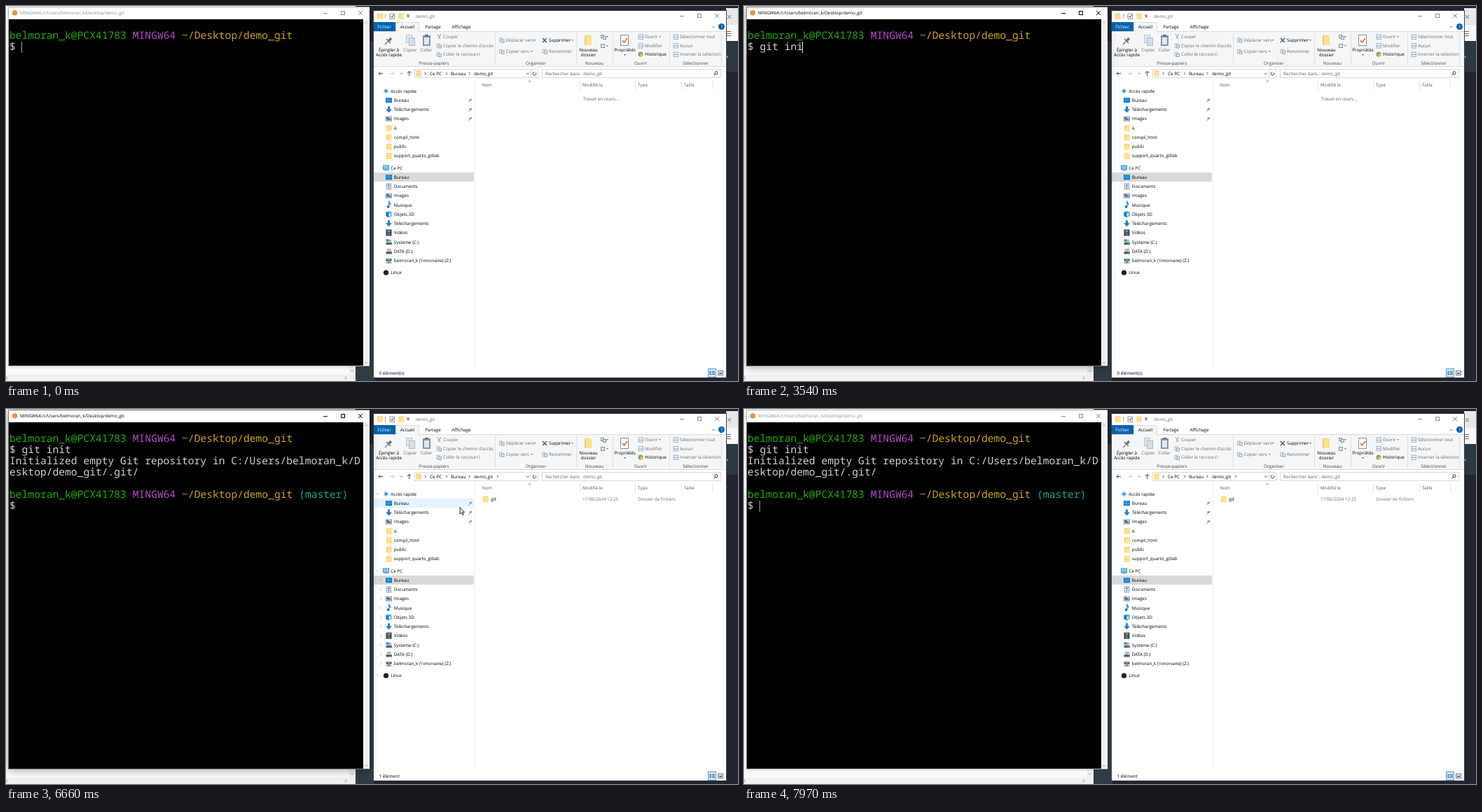
Write an HTML page with a canvas that moves like this. It is 1045x536 px and loops after 8 s.

```html
<!DOCTYPE html>
<html lang="fr">
<head>
<meta charset="utf-8">
<title>git init</title>
<style>
html, body { margin: 0; width: 100%; height: 100%; overflow: hidden; background: #22252f; }
canvas { display: block; }
</style>
</head>
<body>
<canvas id="stage" width="1045" height="536"></canvas>
<script>
const ctx = document.getElementById('stage').getContext('2d');
const LOOP = 8000;
const UI = '"Open Sans", "Noto Sans", sans-serif';
const MONO = '"Noto Sans Mono", "DejaVu Sans Mono", monospace';
const CELL = 8.79, ROW = 16;
const USER = 'belmoran_k';
const GREEN = '#20ad0a', PURPLE = '#b44cc8', GOLD = '#cda41c', CYAN = '#10a99b', WHITE = '#d2d2d2';
const INK = '#000', DIM = '#6a6a6a';

const clamp = v => Math.max(0, Math.min(1, v));
const ramp = (t, from, to) => clamp((t - from) / (to - from));

function box(x, y, w, h, fill, stroke) {
  if (fill) { ctx.fillStyle = fill; ctx.fillRect(x, y, w, h); }
  if (stroke) { ctx.strokeStyle = stroke; ctx.lineWidth = 1; ctx.strokeRect(x + .5, y + .5, w - 1, h - 1); }
}
function line(color, width, ...pts) {
  ctx.strokeStyle = color;
  ctx.lineWidth = width;
  ctx.beginPath();
  for (let i = 0; i < pts.length; i += 2) ctx.lineTo(pts[i], pts[i + 1]);
  ctx.stroke();
}
function poly(fill, ...pts) {
  ctx.fillStyle = fill;
  ctx.beginPath();
  for (let i = 0; i < pts.length; i += 2) ctx.lineTo(pts[i], pts[i + 1]);
  ctx.closePath();
  ctx.fill();
}
function disc(x, y, r, fill) {
  ctx.fillStyle = fill;
  ctx.beginPath();
  ctx.arc(x, y, r, 0, 7);
  ctx.fill();
}
// y is the vertical middle of the letters
function label(text, x, y, color = INK, align = 'left', size = 6.3) {
  ctx.font = `${size}px ${UI}`;
  ctx.textAlign = align;
  ctx.fillStyle = color;
  ctx.fillText(text, x, y + size * .36);
}
const chevron = {
  right: (x, y, c, r = 2) => line(c, 1, x - r / 2, y - r, x + r / 2, y, x - r / 2, y + r),
  down: (x, y, c, r = 2) => line(c, 1, x - r, y - r / 2, x, y + r / 2, x + r, y - r / 2),
  up: (x, y, c, r = 2) => line(c, 1, x - r, y + r / 2, x, y - r / 2, x + r, y + r / 2),
  left: (x, y, c, r = 2) => line(c, 1, x + r / 2, y - r, x - r / 2, y, x + r / 2, y + r),
};
const dropMark = (x, y, c = '#666') => poly(c, x - 1.7, y - 1, x + 1.7, y - 1, x, y + 1);

function windowButtons(x, y, gap, color) {
  line(color, 1, x - 3, y + .5, x + 3, y + .5);
  box(x + gap - 3, y - 3, 6, 6, null, color);
  const cx = x + 2 * gap;
  line(color, 1, cx - 3, y - 3, cx + 3, y + 3);
  line(color, 1, cx - 3, y + 3, cx + 3, y - 3);
}

// Small icons, centred on x, y
const icons = {
  folder(x, y) {
    box(x - 3.5, y - 4, 7.5, 8.5, '#f6d06f');
    box(x - 2.5, y - 3, 6.5, 7.5, '#ffe08c');
  },
  star(x, y) {
    const pts = [];
    for (let i = 0; i < 10; i++) {
      const a = i * Math.PI / 5 - .9, r = i % 2 ? 1.7 : 4.2;
      pts.push(x + r * Math.cos(a), y + r * Math.sin(a));
    }
    poly('#2f97d9', ...pts);
  },
  desktop(x, y) {
    box(x - 4.5, y - 3.5, 9, 7, '#0b6fc0');
    box(x - 3.5, y - 2.5, 7, 4.5, '#1e9bf0');
  },
  download(x, y) {
    poly('#1f7fd6', x - 1.5, y - 4.5, x + 1.5, y - 4.5, x + 1.5, y - .5, x + 4.5, y - .5,
      x, y + 4.5, x - 4.5, y - .5, x - 1.5, y - .5);
  },
  picture(x, y) {
    box(x - 4.5, y - 3.5, 9, 7, '#e7eef3', '#8b98a3');
    box(x - 3, y - 1, 6, 3, '#4b86b5');
    box(x - 3, y - 2, 3, 2, '#35566f');
  },
  computer(x, y) {
    box(x - 4.5, y - 4, 9, 6.5, '#2c87c6');
    box(x - 3.7, y - 3.2, 7.4, 4.8, '#79cdf5');
    box(x - 2.5, y + 3, 6, 1, '#6c8ca3');
  },
  document(x, y) {
    box(x - 3.5, y - 4.5, 7, 9, '#f4f8fb', '#8d9aa5');
    box(x - 1.5, y - 2.5, 3, 2, '#3d8cc8');
    box(x - 1.5, y + .5, 3, 2, '#7ea6c2');
  },
  music(x, y) {
    disc(x - 1, y + 2.5, 2, '#1683d8');
    line('#1683d8', 1.3, x + .4, y + 2.5, x + .4, y - 4.5, x + 2.8, y - .5);
  },
  cube(x, y) {
    poly('#46b4e6', x, y - 4.5, x + 4, y - 3, x + 4, y + 3, x, y + 4.5, x - 4, y + 3, x - 4, y - 3);
    poly('#147fbd', x - 4, y - 3, x, y - 1.5, x, y + 4.5, x - 4, y + 3);
    box(x, y - 1, 2.5, 3.5, '#d5f0fb');
  },
  video(x, y) {
    box(x - 4, y - 4.5, 8, 9, '#3c4148');
    box(x - 2, y - 3.5, 4, 3, '#7d95a8');
    box(x - 2, y + .5, 4, 3, '#5f7690');
  },
  drive(x, y) {
    box(x - 4, y + .5, 8.5, 3.5, '#59636b');
    box(x - 2.5, y - 3.5, 6, 3.5, '#a9b8c1');
    box(x + 2, y + 2, 1.5, 1, '#5fe06b');
  },
  systemDrive(x, y) {
    icons.drive(x, y);
    box(x - 4, y - 4, 4, 3.5, '#1f9de8');
  },
  network(x, y) {
    box(x - 4, y - 2.5, 8, 3.5, '#4d5a52');
    box(x - 2.5, y - 1.5, 5, 1, '#b9c6bd');
    box(x - 1, y + 1, 2, 3, '#28a745');
    box(x - 4, y + 2.5, 8, 1.2, '#28a745');
  },
  dot(x, y) { disc(x, y, 3.6, '#222'); },
  tick(x, y) {
    box(x - 3.5, y - 4, 7.5, 8.5, '#fff', '#999');
    line('#333', 1, x - 1.5, y, x, y + 2, x + 2.5, y - 2);
  },
  tile(x, y) {
    box(x - 3.5, y - 3.5, 7.5, 7.5, '#e8eef4', '#a8b8c8');
    line('#8fabc4', 1, x - 3, y + .5, x + 4, y + .5);
  },
  page(x, y) {
    box(x - 3.5, y - 3, 5, 6, '#eef2f6', '#a9b6c3');
    box(x - 1, y - 1, 5, 5, '#dfe8f0', '#90a8bf');
  },
  pin(x, y) {
    line('#888', 2, x - .3, y + .3, x + 1.8, y - 1.8);
    line('#888', 1, x - 2.7, y + 2.7, x, y, x - 2, y - 1);
  },
};

// [icon, text, y, indent, chevron]
const nav = [
  ['star', 'Accès rapide', 121.5, 0, 'down'],
  ['desktop', 'Bureau', 134.7, 1, 'pin'],
  ['download', 'Téléchargements', 148, 1, 'pin'],
  ['picture', 'Images', 161.2, 1, 'pin'],
  ['folder', 'A', 174.4, 1],
  ['folder', 'compil_html', 187.6, 1],
  ['folder', 'public', 200.9, 1],
  ['folder', 'support_quarto_gitlab', 214.1, 1],
  ['computer', 'Ce PC', 231.5, 0, 'down'],
  ['desktop', 'Bureau', 244.8, 1, 'right'],
  ['document', 'Documents', 258, 1, 'right'],
  ['picture', 'Images', 271.2, 1, 'right'],
  ['music', 'Musique', 284.4, 1, 'right'],
  ['cube', 'Objets 3D', 297.6, 1, 'right'],
  ['download', 'Téléchargements', 310.8, 1, 'right'],
  ['video', 'Vidéos', 324, 1, 'right'],
  ['systemDrive', 'Systeme (C:)', 337.3, 1, 'right'],
  ['drive', 'DATA (D:)', 350.5, 1, 'right'],
  ['network', USER + ' (\\\\morvane) (Z:)', 363.8, 1, 'right'],
  ['dot', 'Linux', 381.2, 0, 'right'],
];
const SELECTED = 9, NETWORK = 18;

function backdrop() {
  box(0, 0, 1045, 536, '#22252f');
  box(0, 0, 499, 536, '#fafafa');
  box(0, 527, 499, 9, '#f1f1f1');
  box(489, 514, 10, 13, '#f1f1f1');
  chevron.down(494, 521.5, '#999');
  chevron.right(485, 531.5, '#888');
  chevron.left(1, 531.5, '#888');
  box(499, 50, 26, 486, '#2f3c45');
  box(1028, 3, 17, 24, '#e6e8ec');
  box(1028, 27, 17, 23, '#f8f8f9');
  box(1028, 50, 17, 44, '#2a3942');
  line('#666', 1, 1030, 13, 1035, 18);
  line('#666', 1, 1030, 18, 1035, 13);
  for (const y of [36.5, 39.5, 42.5]) line('#666', 1, 1029, y, 1035, y);
  line('#d5dde0', 1.2, 1027, 68, 1030, 74);
}

function ribbon() {
  box(525, 36, 503, 51, '#f5f6f7');
  line('#dadbdc', 1, 525, 86.5, 1028, 86.5);
  line('#dadbdc', 1, 525, 36.5, 1028, 36.5);
  box(525, 23, 31, 13, '#0063b1');
  label('Fichier', 540, 29.8, '#fff', 'center');
  box(556, 23, 34, 14, '#f5f6f7');
  line('#dadbdc', 1, 556.5, 37, 556.5, 23.5, 589.5, 23.5, 589.5, 37);
  label('Accueil', 573, 29.8, INK, 'center');
  label('Partage', 609.5, 29.8, INK, 'center');
  label('Affichage', 650, 29.8, INK, 'center');
  chevron.up(1010, 30, '#888');
  disc(1021.5, 29.5, 4.5, '#0063b1');
  label('?', 1021.5, 29.5, '#fff', 'center');
  for (const x of [698.5, 814.5, 866.5, 947.5, 1021.5]) line('#dedfe0', 1, x, 39, x, 84);

  const groups = [['Presse-papiers', 611], ['Organiser', 756.5], ['Nouveau', 840], ['Ouvrir', 906], ['Sélectionner', 984.5]];
  for (const [text, x] of groups) label(text, x, 81.6, '#444', 'center');

  const large = [['Épingler à', 546.5, 63], ['Accès rapide', 546.5, 70], ['Nouveau', 831.5, 63], ['dossier', 831.5, 70], ['Propriétés', 883.5, 63]];
  for (const [text, x, y] of large) label(text, x, y, INK, 'center');
  label('Copier', 577, 63, DIM, 'center');
  label('Coller', 600, 63, DIM, 'center');
  dropMark(883.5, 70);

  const small = [
    ['Couper', 624, 44], ["Copier le chemin d'accès", 624, 56.5], ['Coller le raccourci', 624, 69],
    ['Déplacer vers', 713.5, 48.5], ['Copier vers', 713.5, 64.7], ['Renommer', 775, 64.7],
    ['Ouvrir', 912, 44], ['Modifier', 912, 56.5],
    ['Sélectionner tout', 962, 44], ['Aucun', 962, 56.5], ['Inverser la sélection', 962, 69],
  ];
  for (const [text, x, y] of small) {
    label(text, x, y, DIM);
    if (text === 'Couper') {
      line('#8a939b', 1, 616, 40, 620, 47);
      line('#8a939b', 1, 621, 40, 617, 47);
    } else (x === 962 || x === 912 ? icons.tile : icons.page)(x - 6, y);
  }
  label('Supprimer', 775, 48.5);
  label('Historique', 912, 69);
  line('#445c7a', 1.5, 766, 46, 772, 52);
  line('#445c7a', 1.5, 766, 52, 772, 46);
  disc(906, 69, 3.5, '#7fa65c');
  disc(907, 70, 2, '#e7c54a');
  for (const [x, y] of [[755, 49], [750.5, 65], [808.5, 49], [933.5, 44], [858.5, 44], [858.5, 57]]) dropMark(x, y, '#888');

  line('#6c7780', 3.5, 546, 50, 550, 46);
  line('#6c7780', 1.2, 541, 55, 546, 50);
  line('#6c7780', 1.5, 543, 47, 549, 53);
  box(571, 41, 9, 12, '#dfe8f0', '#b4c3d2');
  box(575, 45, 9, 12, '#d3e0ec', '#a9bccf');
  box(595, 42, 11, 15, '#8296ac');
  box(597, 45, 7, 10, '#e3e9ef');
  box(598, 41, 5, 2, '#5d6b79');
  box(826, 42, 9, 14, '#f4cd68');
  box(828, 43, 8, 13, '#ffe18d');
  box(849, 41, 5, 5, '#dce6ef', '#8194a8');
  box(852, 43, 5, 5, '#dce6ef', '#8194a8');
  box(849, 54, 6, 6, '#dce6ef', '#8194a8');
  box(877, 41, 12, 16, '#fff', '#8c8c8c');
  line('#d0752c', 1.7, 880, 49, 882.5, 52, 887, 46);
}

function addressBar(loaded) {
  const arrow = (x, y, c, s) => {
    line(c, 1, x - 3, y, x + 3, y);
    line(c, 1, x + s * .5, y - 2.5, x + s * 3, y, x + s * .5, y + 2.5);
  };
  arrow(535, 96.5, '#444', -1);
  arrow(551, 96.5, '#ccc', 1);
  chevron.down(564.5, 96.5, '#777', 1.5);
  line('#444', 1, 575.7, 100, 575.7, 93.5);
  line('#444', 1, 573, 96, 575.7, 93.2, 578.5, 96);
  box(583, 90, 177, 13, '#fff', '#d9d9d9');
  box(765, 90, 256, 13, '#fff', '#d9d9d9');
  icons.folder(589, 96.3);
  for (const x of [598.5, 629, 661.5]) chevron.right(x, 96.5, '#444', 1.7);
  if (loaded) chevron.right(702, 96.5, '#444', 1.7);
  label('Ce PC', 605, 96.3);
  label('Bureau', 635, 96.3);
  label('demo_git', 668, 96.3);
  chevron.down(745, 96.7, '#555');
  line('#d9d9d9', 1, 749.5, 91, 749.5, 102);
  ctx.strokeStyle = '#444';
  ctx.beginPath();
  ctx.arc(754.5, 96.7, 2.3, -.6, 4.6);
  ctx.stroke();
  label('Rechercher dans : demo_git', 770, 96.3, '#606060');
  ctx.strokeStyle = '#333';
  ctx.beginPath();
  ctx.arc(1014, 95.7, 2, 0, 7);
  ctx.stroke();
  line('#333', 1, 1012.5, 97.2, 1010.5, 99.5);
}

function navigation(chevrons, hovered) {
  nav.forEach(([icon, text, y, indent, mark], i) => {
    if (i === SELECTED) box(525, Math.round(y - 6.6), 143, 13, '#d9d9d9');
    else if (i === hovered) box(525, Math.round(y - 6.6), 143, 13, '#e5f3ff');
    icons[icon](542.5 + 4 * indent, y);
    label(text, 549.2 + 4.6 * indent, y);
    if (mark === 'pin') icons.pin(663, y);
    else if (mark && chevrons > 0) chevron[mark](530.5 + 4.5 * indent, y, `rgba(35,35,35,${chevrons})`);
  });
  line('#f0f0f0', 1, 669.5, 106, 669.5, 517);
}

function explorer(t) {
  box(524, 6, 505, 526, '#3a3f48');
  box(525, 7, 503, 524, '#fff');
  icons.folder(533.5, 14.5);
  line('#aaa', 1, 541.5, 11, 541.5, 18);
  icons.tick(551, 14.5);
  icons.folder(564, 14.5);
  dropMark(574, 15.5, '#333');
  line('#333', 1, 572.3, 13, 575.7, 13);
  label('demo_git', 585, 14.5, '#707070');
  windowButtons(965, 14, 25, '#8a8a8a');
  ribbon();
  addressBar(t >= 5980);

  for (const [text, x] of [['Nom', 679.5], ['Modifié le', 823], ['Type', 902], ['Taille', 968]]) label(text, x, 113, '#4c5a67');
  for (const x of [819.5, 898.5, 964.5, 1008.5]) line('#e5e5e5', 1, x, 107, x, 120);
  chevron.up(747.5, 107.5, '#777', 1.7);

  navigation(chevronAlpha(t), hoveredRow(t));

  if (t < 5680) label('Travail en cours...', 824, 132.3, '#606060');
  else {
    icons.folder(684.5, 128.8);
    label('.git', 691, 129);
    label('17/06/2024 12:25', 823, 129, '#6d6d6d');
    label('Dossier de fichiers', 902, 129, '#6d6d6d');
  }
  label(t < 5830 ? '0 élément(s)' : '1 élément', 532.5, 524.8);
  box(1002, 518, 12, 13, '#cce8ff', '#4aa5df');
  for (const y of [522.5, 524.5, 526.5]) {
    line('#555', 1, 1004, y, 1007, y);
    line('#555', 1, 1008, y, 1012, y);
  }
  box(1016, 521, 8, 7, '#e5e9ed', '#777');
  box(1018, 524, 4, 2, '#3f6c93');
}

const keys = [[2030, 'g'], [2180, 'i'], [2230, 't'], [2630, ' '], [3090, 'i'], [3340, 'n'], [3540, 'i'], [3850, 't']];

function print(row, ...parts) {
  ctx.font = `${CELL / .6}px ${MONO}`;
  ctx.textAlign = 'left';
  let col = 0;
  for (const [text, color] of parts) {
    ctx.fillStyle = color;
    ctx.fillText(text, 5 + col * CELL, 19 + row * ROW + 12);
    col += text.length;
  }
}
function prompt(row, branch) {
  print(row, [USER + '@PCX41783 ', GREEN], ['MINGW64 ', PURPLE], ['~/Desktop/demo_git ', GOLD], [branch, CYAN]);
  print(row + 1, ['$', WHITE]);
}

function caret(t, focus) {
  const off = [[1520, 2030], [5480, 6020], [6540, 7060], [7570, 7720]];
  if (off.some(([a, b]) => t >= a && t < b)) return;
  const typed = keys.filter(k => t >= k[0]).length;
  let col = 2 + typed, row = 2;
  if (t >= 5020) { col = 2; row = 7; }
  else if (t >= 4570) { col = 0; row = 5; }
  else if (t >= 4300) { col = 0; row = 3; }
  box(Math.floor(4.5 + col * CELL), 19 + row * ROW, 1, ROW, focus > .5 ? '#e0e0e0' : '#a0a0a0');
}

function terminal(t) {
  const focus = ramp(t, 1000, 1200) * (1 - ramp(t, 7720, 7900));
  const tone = v => `rgb(${v},${v},${v})`;
  const ink = tone(Math.round(140 * (1 - focus)));
  ctx.save();
  ctx.shadowColor = `rgba(0,0,0,${.15 + .2 * focus})`;
  ctx.shadowBlur = 4 + 8 * focus;
  ctx.shadowOffsetY = 1;
  box(3, 1, 516, 514, tone(Math.round(180 - 60 * focus)));
  ctx.restore();
  box(4, 2, 515, 512, '#fff');
  disc(12.5, 9.8, 3.8, '#e8963c');
  label(`MINGW64:/c/Users/${USER}/Desktop/demo_git`, 20, 10, ink);
  windowButtons(456, 10, 25, ink);
  box(4, 19, 506, 495, '#000');
  box(510, 19, 8, 495, '#f1f1f1');
  chevron.up(514, 23.5, '#aaa');
  chevron.down(514, 510, '#aaa');

  prompt(1, '');
  print(2, ['  ' + keys.filter(k => t >= k[0]).map(k => k[1]).join(''), WHITE]);
  if (t >= 4570) {
    print(3, [`Initialized empty Git repository in C:/Users/${USER}/D`, WHITE]);
    print(4, ['esktop/demo_git/.git/', WHITE]);
  }
  if (t >= 5020) prompt(6, '(master)');
  caret(t, focus);
}

// Mouse journeys as [time, x, y]
const journeys = [
  [[50, 887, 512], [180, 720, 425], [300, 430, 270], [430, 100, 95], [500, 12, 54], [600, 35.5, 56],
    [800, 35.5, 56], [850, 35.5, 61], [1000, 35.5, 61], [1370, 33.5, 60], [2030, 33.5, 60]],
  [[5980, 34, 70], [6200, 180, 95], [6400, 420, 120], [6560, 620, 135], [6660, 660, 143], [6730, 655, 165],
    [6880, 615, 270], [6960, 550, 362], [7030, 492.5, 397], [7200, 450, 470], [7350, 430, 545]],
];
function mouseAt(t) {
  const path = journeys.find(j => t >= j[0][0] && t < j[j.length - 1][0]);
  if (!path) return null;
  const step = Math.max(path[0][0], Math.floor((t - 30) / 50) * 50 + 30);
  const i = path.findIndex((p, n) => n && step < p[0]);
  const [a, b] = [path[i - 1], path[i]], k = ramp(step, a[0], b[0]);
  return { x: a[1] + (b[1] - a[1]) * k, y: a[2] + (b[2] - a[2]) * k };
}
function chevronAlpha(t) {
  return t < 5000 ? .5 * ramp(t, 200, 330) * (1 - ramp(t, 380, 600))
    : ramp(t, 6580, 6900) * (1 - ramp(t, 7150, 7600));
}
function hoveredRow(t) {
  if (t >= 6980 && t < 7180) return NETWORK;
  const m = mouseAt(t - 60);
  return m && m.x > 525 && m.x < 668 ? nav.findIndex(r => Math.abs(r[2] - m.y) < 6.6) : -1;
}

function mouse(t) {
  const m = mouseAt(t);
  if (!m) return;
  const { x, y } = m;
  if (x < 509 && y > 19 && y < 514) {
    line('#ddd', 1, x, y - 4, x, y + 4);
    line('#ddd', 1, x - 2.5, y - 4.5, x + 2.5, y - 4.5);
    line('#ddd', 1, x - 2.5, y + 4.5, x + 2.5, y + 4.5);
    return;
  }
  const outline = [0, 0, 0, 9.5, 2.2, 7.5, 3.8, 11, 5.3, 10.3, 3.8, 7, 6.6, 7];
  const pts = outline.map((v, i) => v + (i % 2 ? y : x));
  poly('#fff', ...pts);
  line('#111', .9, ...pts, x, y);
}

function draw(now) {
  const t = now % LOOP;
  backdrop();
  explorer(t);
  terminal(t);
  mouse(t);
  requestAnimationFrame(draw);
}
ctx.textRendering = 'geometricPrecision';
requestAnimationFrame(draw);
</script>
</body>
</html>
```
